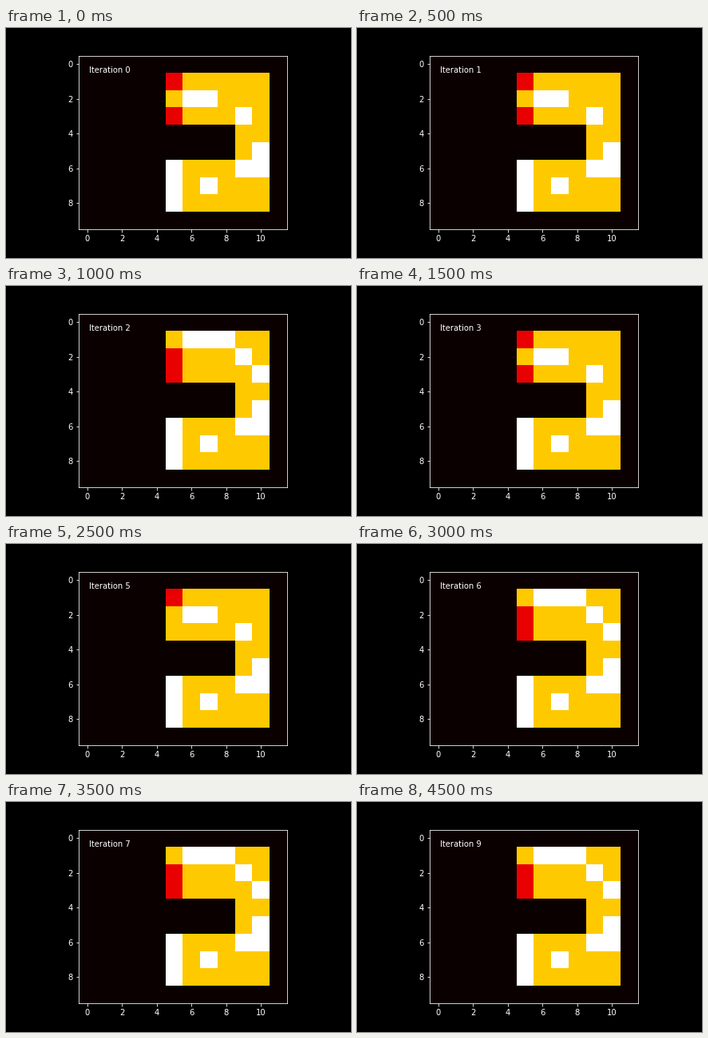
Animation of 432x288 px, one loop 5000 ms. Source, as a matplotlib script:

```python
import numpy as np
import matplotlib.pyplot as plt
from matplotlib.animation import FuncAnimation

plt.style.use("dark_background")
plt.rcParams.update({"font.family": "DejaVu Sans", "font.size": 10})

STEP_MS = 500
COLS, ROWS = 12, 10

# Cell values: 0 empty, 1 red, 2 yellow, 3 white
LOWER = ["000022", "000023", "322233", "323222", "322222"]
UPPER = {
    "A": ["122222", "233222", "122232"],
    "B": ["233322", "122232", "122223"],
    "C": ["122222", "233222", "222232"],
}
SEQUENCE = "AABAACBBBB"


def make_grid(state):
    grid = np.zeros((ROWS, COLS))
    grid[1:9, 5:11] = [[int(c) for c in row] for row in UPPER[state] + LOWER]
    return grid


fig = plt.figure(figsize=(6, 4), dpi=72)
fig.subplots_adjust(left=0.125, right=0.9, bottom=0.125, top=0.88)
ax = fig.add_subplot()
image = ax.imshow(make_grid(SEQUENCE[0]), cmap="hot", vmin=0, vmax=3,
                  interpolation="nearest")
ax.set_xticks(range(0, COLS, 2))
ax.set_yticks(range(0, ROWS, 2))
label = ax.text(0.05, 0.9, "", transform=ax.transAxes)


def update(i):
    image.set_data(make_grid(SEQUENCE[i]))
    label.set_text(f"Iteration {i}")
    return image, label


anim = FuncAnimation(fig, update, frames=len(SEQUENCE), interval=STEP_MS,
                     repeat=True, repeat_delay=0, blit=False)
plt.show()
```
